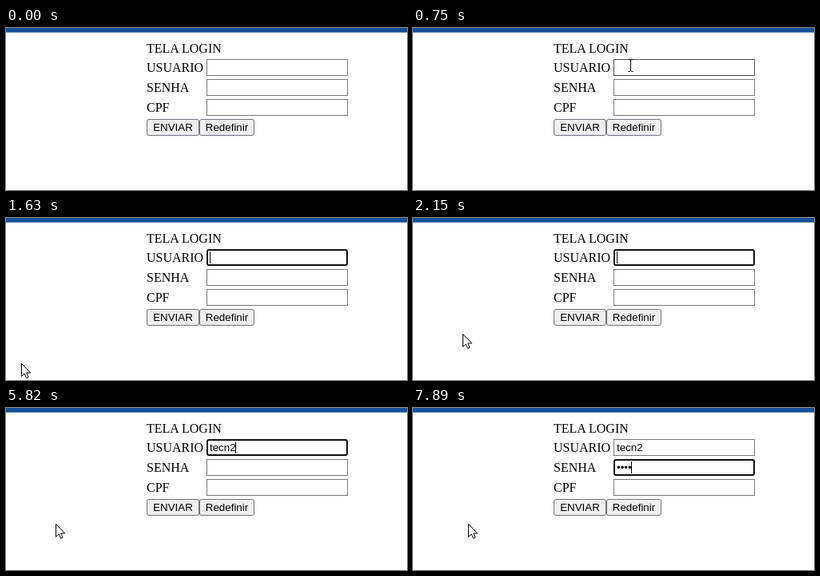
Animation, 502 px wide and 203 px high, one loop 8000 ms. Source, as an HTML page:

```html
<!DOCTYPE html>
<html lang="pt">
<head>
<meta charset="utf-8">
<title>Tela login</title>
<style>
  html, body { margin: 0; width: 100%; height: 100%; overflow: hidden; background: #fff; }
  svg { display: block; width: 502px; height: 203px; }
  text { fill: #000; white-space: pre; }
  .label { font: 16px "Liberation Serif", "Times New Roman", serif; }
  .ui { font: 13.333px "Liberation Sans", Arial, sans-serif; }
  .field { fill: #fff; stroke: #767676; }
  .field.hover { stroke: #4a4a4a; }
  .field.focus { stroke: #101010; stroke-width: 2; }
  .button { fill: #efefef; stroke: #6b717b; }
  .button.hover { fill: #e5e5e5; stroke: #4a4a4a; }
</style>
</head>
<body>
<svg id="stage" viewBox="0 0 502 203" xmlns="http://www.w3.org/2000/svg"></svg>
<script>
const LOOP = 8000;
const stage = document.getElementById('stage');

function add(tag, attrs, text) {
  const el = document.createElementNS('http://www.w3.org/2000/svg', tag);
  set(el, attrs);
  if (text) el.textContent = text;
  stage.appendChild(el);
  return el;
}

function set(el, attrs) {
  for (const key in attrs) el.setAttribute(key, attrs[key]);
}

function inside(b, p) {
  return p.x >= b.x && p.x < b.x + b.w && p.y >= b.y && p.y < b.y + b.h;
}

// Static page
add('rect', { width: 502, height: 5.6, fill: '#17509a' });

const labels = [['TELA LOGIN', 31, 94], ['USUARIO', 55, 71], ['SENHA', 80, 53], ['CPF', 105, 28]]
  .map(([name, y, w]) => {
    add('text', { x: 176, y, class: 'label' }, name);
    return { x: 176, y: y - 14, w, h: 18 };
  });

const fields = [39, 64, 89].map(y => ({
  x: 251, y, w: 177, h: 21,
  box: add('rect', {}),
  value: add('text', { x: 255, y: y + 15, class: 'ui' })
}));

const buttons = [['ENVIAR', 176, 66], ['Redefinir', 242, 69]].map(([name, x, w]) => {
  const box = add('rect', { x: x + .5, y: 114.5, width: w - 1, height: 20, rx: 2.5 });
  add('text', { x: x + w / 2, y: 129, class: 'ui', 'text-anchor': 'middle' }, name);
  return { x, y: 114, w, h: 21, box };
});

const caret = add('rect', { width: 1, height: 15, fill: '#000' });
const arrow = add('path', {
  d: 'M.5 .5V16.5L4.2 13L6.6 18.5L9 17.5L6.7 12H11.7Z',
  fill: '#fff', stroke: '#000'
});
const beam = add('path', {
  d: 'M-2.5 -7.5H-1L.5 -6.5L2 -7.5H3.5M.5 -6.5V6.5M-2.5 7.5H-1L.5 6.5L2 7.5H3.5',
  fill: 'none', stroke: '#000'
});

// Pointer path: time, x, y
const path = [
  [70, 416, 165], [280, 390, 130], [480, 330, 85], [680, 276, 50],
  [749, 272, 47], [817, 272, 47], [1100, 270, 46], [1216, 266, 44],
  [1283, 256, 39], [1416, 150, 115], [1549, 30, 185], [1616, 19, 182],
  [1683, 30, 173], [1749, 47, 158], [1816, 57, 149], [1882, 62, 145],
  [6683, 62, 145], [6816, 69, 145]
];
const TICK = 200 / 3;

function pointerAt(time) {
  const t = Math.floor((time - 16) / TICK) * TICK + 16;
  const i = path.findIndex(k => k[0] > t);
  if (i < 0) return { x: path[path.length - 1][1], y: path[path.length - 1][2] };
  const b = path[i], a = path[Math.max(0, i - 1)];
  const u = i ? (t - a[0]) / (b[0] - a[0]) : 0;
  return { x: Math.round(a[1] + (b[1] - a[1]) * u), y: Math.round(a[2] + (b[2] - a[2]) * u) };
}

// Typing
const user = 'tecn2', mask = '••••';
const userKeys = [2900, 3030, 3300, 3430, 4820];
const maskKeys = [7420, 7550, 7760, 7890];
const widths = { t: 3.7, e: 7.41, c: 6.67, n: 7.41, 2: 7.41, '•': 4.67 };
const FOCUS = 1160, TAB = 6150;
const caretOn = [[FOCUS, 1700], [2150, 2690], [2900, 3970], [4490, 5290], [5820, 6690], [7210, LOOP]];

function typed(text, keys, t) {
  return text.slice(0, keys.filter(k => k <= t).length);
}

function draw(t) {
  const p = pointerAt(t), shown = t >= 70;
  const focus = t < FOCUS ? -1 : t < TAB ? 0 : 1;
  const values = [typed(user, userKeys, t), typed(mask, maskKeys, t), ''];
  let overText = false;

  fields.forEach((f, i) => {
    const hover = shown && inside(f, p), inset = i === focus ? 1 : .5;
    overText = overText || hover;
    set(f.box, {
      class: 'field' + (i === focus ? ' focus' : hover ? ' hover' : ''),
      x: f.x + inset, y: f.y + inset,
      width: f.w - 2 * inset, height: f.h - 2 * inset,
      rx: i === focus ? 2 : 0
    });
    if (f.value.textContent !== values[i]) f.value.textContent = values[i];
  });
  buttons.forEach(b => set(b.box, { class: 'button' + (shown && inside(b, p) ? ' hover' : '') }));
  overText = overText || labels.some(l => inside(l, p));

  const lit = caretOn.some(([a, b]) => t >= a && t < b);
  if (lit) {
    const w = [...values[focus]].reduce((sum, c) => sum + widths[c], 0);
    set(caret, { x: 255 + Math.floor(w), y: fields[focus].y + 3 });
  }
  set(caret, { visibility: lit ? 'visible' : 'hidden' });

  const place = `translate(${p.x} ${p.y})`;
  set(arrow, { transform: place, visibility: shown && !overText ? 'visible' : 'hidden' });
  set(beam, { transform: place, visibility: shown && overText ? 'visible' : 'hidden' });
}

const start = performance.now();
function tick() {
  draw((performance.now() - start) % LOOP);
  requestAnimationFrame(tick);
}
tick();
</script>
</body>
</html>
```
